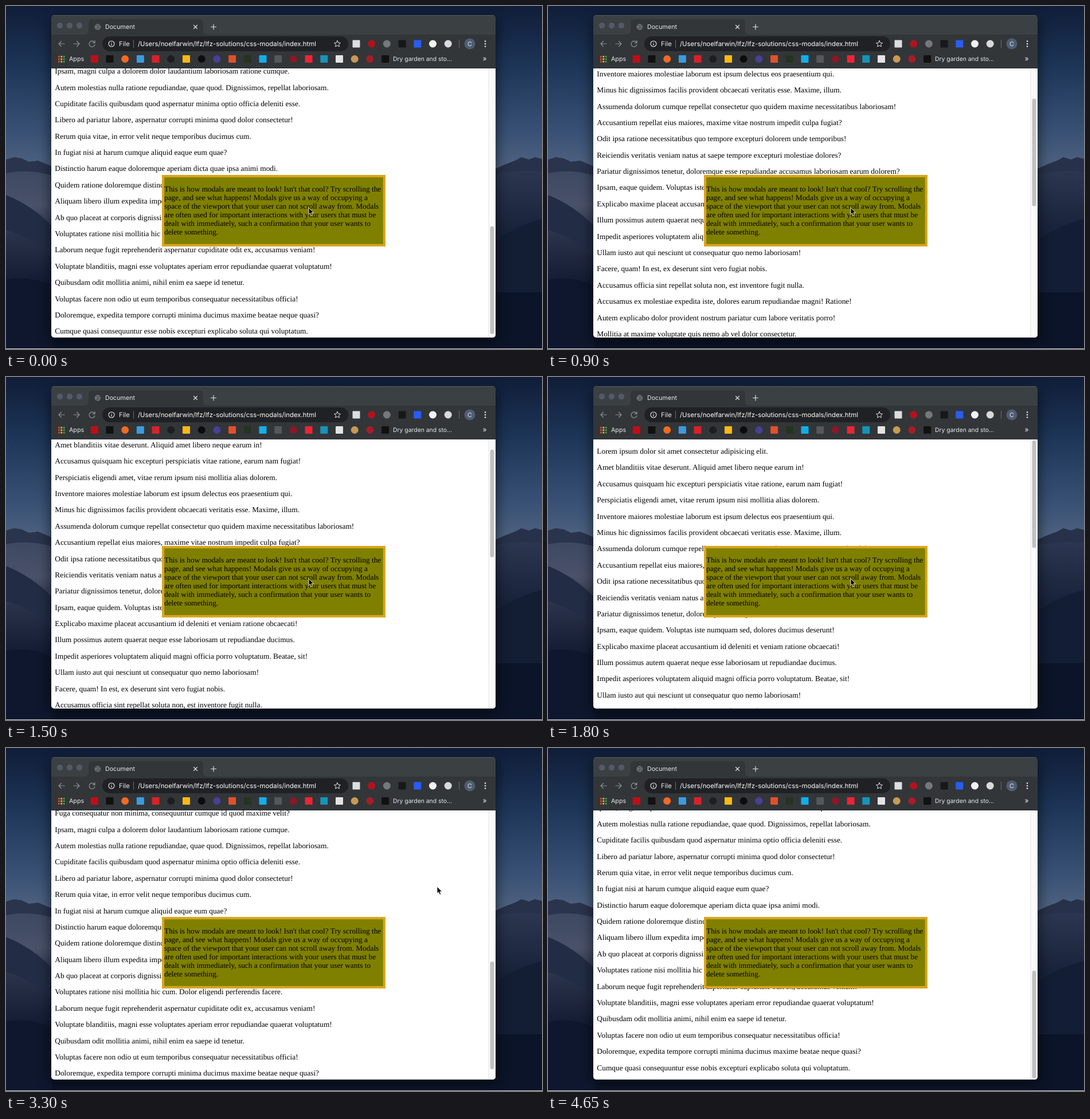
Write an HTML page that moves like this. It is 935x599 px and loops after 5400 ms.

```html
<!DOCTYPE html>
<html lang="en">
<head>
<meta charset="utf-8">
<title>Document</title>
<style>
html, body { margin: 0; height: 100%; overflow: hidden; background: #0b1428; }
svg { display: block; }
text { text-rendering: geometricPrecision; white-space: pre; }
.serif { font: 13.36px "Liberation Serif", "Times New Roman", serif; }
.ui { font: 10.7px Inter, Roboto, sans-serif; fill: #e8eaed; }
.line { fill: none; stroke: #e0e2e5; stroke-width: 1.2; stroke-linecap: round; stroke-linejoin: round; }
.dim { stroke: #8d9196; }
</style>
</head>
<body>
<svg id="stage" width="935" height="599" viewBox="0 0 935 599">
  <defs>
    <linearGradient id="sky" x2="0" y2="1">
      <stop offset="0" stop-color="#101d38"/><stop offset=".35" stop-color="#1d3557"/>
      <stop offset=".75" stop-color="#3a5275"/><stop offset="1" stop-color="#566884"/>
    </linearGradient>
    <linearGradient id="sand" x2="0" y2="1">
      <stop offset="0" stop-color="#3d4862"/><stop offset=".3" stop-color="#4a5269"/>
      <stop offset=".55" stop-color="#2a3249"/><stop offset="1" stop-color="#111a31"/>
    </linearGradient>
    <linearGradient id="dusk" x2="0" y2="1">
      <stop offset="0" stop-color="#2c3650"/><stop offset=".5" stop-color="#182239"/>
      <stop offset="1" stop-color="#0d162b"/>
    </linearGradient>
    <filter id="blur" x="-10%" y="-10%" width="120%" height="120%"><feGaussianBlur stdDeviation="11"/></filter>
    <clipPath id="frame"><rect x="79" y="16" width="775" height="563" rx="5"/></clipPath>
  </defs>

  <!-- desktop -->
  <rect width="935" height="599" fill="#0b1428"/>
  <rect width="935" height="300" fill="url(#sky)"/>
  <path d="M0 268L14 264 27 266 40 272 56 270 80 280V320H0Z" fill="#2a344d"/>
  <path d="M0 292Q40 284 80 296V490L0 478Z" fill="url(#sand)"/>
  <path d="M0 330Q45 348 80 384V440Q40 400 0 392Z" fill="#222c44"/>
  <path d="M0 478Q40 470 80 488V599H0Z" fill="#0e172d"/>
  <path d="M854 284L872 276 888 270 899 264 912 268 923 264 935 267V320H854Z" fill="#27314a"/>
  <path d="M854 294Q900 284 935 290V500H854Z" fill="url(#dusk)"/>
  <path d="M854 408Q900 380 935 372V500H854Z" fill="#131d34"/>
  <path d="M0 598.5H935" stroke="#d5d8de"/>
  <rect x="77" y="24" width="779" height="561" rx="8" fill="#000" opacity=".55" filter="url(#blur)"/>

  <g clip-path="url(#frame)">
    <rect x="79" y="16" width="775" height="93" fill="#3b4043"/>
    <path d="M79 16.5H854" stroke="#5a5e61"/>
    <path d="M136 50Q144 50 144 42V30Q144 23 151 23H337Q344 23 344 30V42Q344 50 352 50H854V109H79V50Z" fill="#323639"/>
    <g fill="#545868"><circle cx="94" cy="34" r="5.2"/><circle cx="111" cy="34" r="5.2"/><circle cx="128" cy="34" r="5.2"/></g>
    <circle cx="160" cy="36.5" r="5.4" fill="#6b6f73"/>
    <path d="M156 33l4 1 1 3-3 3M162 32l2 3M162 39l2-1" class="line" style="stroke:#44484b"/>
    <text x="173" y="40.3" class="ui">Document</text>
    <path d="M327.5 33.5l6 6m0-6l-6 6M357.5 36.5h9m-4.5-4.5v9" class="line"/>
    <path d="M102 66H92m4.5-4.5L92 66l4.500 4.500M118 66h10m-4.500-4.500L128 66l-4.500 4.500M154 63a5 5 0 1 0 1 4.500M155 60.500v3.800h-3.800" class="line dim"/>
    <rect x="168" y="53" width="429" height="26" rx="13" fill="#202124"/>
    <g class="line"><circle cx="184" cy="66" r="5"/><path d="M184 65.500v3M184 63.200v.1"/></g>
    <path d="M222.500 59v14" stroke="#6a6d70"/>
    <path d="M578 60.500l1.600 3.600 3.900.4-2.900 2.600.8 3.900-3.400-2-3.400 2 .8-3.900-2.900-2.600 3.900-.4Z" class="line" style="stroke-width:1"/>
    <text x="197" y="70" class="ui" style="font-size:11.4px">File</text>
    <text x="230" y="70" class="ui" style="font-size:11.4px;fill:#fff">/Users/noelfarwin/lfz/lfz-solutions/css-modals/index.html</text>
    <g id="icons"></g>
    <path d="M790.500 59v14" stroke="#6a6d70"/>
    <circle cx="809" cy="66" r="9.500" fill="#4f5d75"/>
    <text x="809" y="69.800" class="ui" text-anchor="middle">C</text>
    <g fill="#e8eaed"><circle cx="836" cy="61.500" r="1.300"/><circle cx="836" cy="66" r="1.300"/><circle cx="836" cy="70.500" r="1.300"/></g>
    <text x="110" y="96.200" class="ui">Apps</text>
    <text x="675" y="96.200" class="ui" style="font-size:10.4px">Dry garden and sto...</text>
    <text x="831.500" y="96" class="ui" style="font-size:12px">»</text>

    <svg x="79" y="108" width="775" height="471">
      <rect width="775" height="471" fill="#fff"/>
      <g id="list" class="serif"></g>
      <rect x="763" width="12" height="471" fill="#fafafa"/>
      <path d="M763 0V471" stroke="#e4e4e4"/>
      <rect id="thumb" x="765.500" width="7" height="188" rx="3.500" fill="#c1c1c1"/>
    </svg>
    <path d="M79 108.500H854" stroke="#25282a"/>
    <rect x="274.100" y="297.100" width="385.800" height="120.800" fill="#808000" stroke="#daa520" stroke-width="4.200"/>
    <g id="modal" class="serif"></g>
  </g>
  <path id="cursor" d="M0 0V12.200L2.700 9.700 4.700 14.300 6.800 13.400 4.900 8.900H8.600Z" fill="#000" stroke="#fff" stroke-width=".9"/>
</svg>
<script>
const $ = id => document.getElementById(id);

function add(parent, tag, attrs, text) {
  const el = document.createElementNS('http://www.w3.org/2000/svg', tag);
  for (const k in attrs) el.setAttribute(k, attrs[k]);
  if (text) el.textContent = text;
  $(parent).append(el);
}

const paragraphs = `Lorem ipsum dolor sit amet consectetur adipisicing elit.
Amet blanditiis vitae deserunt. Aliquid amet libero neque earum in!
Accusamus quisquam hic excepturi perspiciatis vitae ratione, earum nam fugiat!
Perspiciatis eligendi amet, vitae rerum ipsum nisi mollitia alias dolorem.
Inventore maiores molestiae laborum est ipsum delectus eos praesentium qui.
Minus hic dignissimos facilis provident obcaecati veritatis esse. Maxime, illum.
Assumenda dolorum cumque repellat consectetur quo quidem maxime necessitatibus laboriosam!
Accusantium repellat eius maiores, maxime vitae nostrum impedit culpa fugiat?
Odit ipsa ratione necessitatibus quo tempore excepturi dolorem unde temporibus!
Reiciendis veritatis veniam natus at saepe tempore excepturi molestiae dolores?
Pariatur dignissimos tenetur, doloremque esse repudiandae accusamus laboriosam earum dolorem?
Ipsam, eaque quidem. Voluptas iste numquam sed, dolores ducimus deserunt!
Explicabo maxime placeat accusantium id deleniti et veniam ratione obcaecati!
Illum possimus autem quaerat neque esse laboriosam ut repudiandae ducimus.
Impedit asperiores voluptatem aliquid magni officia porro voluptatum. Beatae, sit!
Ullam iusto aut qui nesciunt ut consequatur quo nemo laboriosam!
Facere, quam! In est, ex deserunt sint vero fugiat nobis.
Accusamus officia sint repellat soluta non, est inventore fugit nulla.
Accusamus ex molestiae expedita iste, dolores earum repudiandae magni! Ratione!
Autem explicabo dolor provident nostrum pariatur cum labore veritatis porro!
Mollitia at maxime voluptate quis nemo ab vel dolor consectetur.
Animi tempora dolorem necessitatibus quos ipsum rerum exercitationem unde modi?
Fuga consequatur non minima, consequuntur cumque id quod maxime velit?
Ipsam, magni culpa a dolorem dolor laudantium laboriosam ratione cumque.
Autem molestias nulla ratione repudiandae, quae quod. Dignissimos, repellat laboriosam.
Cupiditate facilis quibusdam quod aspernatur minima optio officia deleniti esse.
Libero ad pariatur labore, aspernatur corrupti minima quod dolor consectetur!
Rerum quia vitae, in error velit neque temporibus ducimus cum.
In fugiat nisi at harum cumque aliquid eaque eum quae?
Distinctio harum eaque doloremque aperiam dicta quae ipsa animi modi.
Quidem ratione doloremque distinctio? Eius perferendis corrupti tenetur maxime minus?
Aliquam libero illum expedita impedit earum rem sit aperiam voluptate.
Ab quo placeat at corporis dignissimos, eaque itaque! Blanditiis, dolorem.
Voluptates ratione nisi mollitia hic cum. Dolor eligendi perferendis facere.
Laborum neque fugit reprehenderit aspernatur cupiditate odit ex, accusamus veniam!
Voluptate blanditiis, magni esse voluptates aperiam error repudiandae quaerat voluptatum!
Quibusdam odit mollitia animi, nihil enim ea saepe id tenetur.
Voluptas facere non odio ut eum temporibus consequatur necessitatibus officia!
Doloremque, expedita tempore corrupti minima ducimus maxime beatae neque quasi?
Cumque quasi consequuntur esse nobis excepturi explicabo soluta qui voluptatum.`;
paragraphs.split('\n').forEach((p, i) => add('list', 'text', { x: 6.3, y: 26 + i * 28.39 }, p));

`This is how modals are meant to look! Isn't that cool? Try scrolling the
page, and see what happens! Modals give us a way of occupying a
space of the viewport that your user can not scroll away from. Modals
are often used for important interactions with your users that must be
dealt with immediately, such a confirmation that your user wants to
delete something.`.split('\n').forEach((s, i) => add('modal', 'text', { x: 276, y: 324.2 + i * 15.03 }, s));

// plain marks: an upper-case letter is a square, "o" a circle
const disc = (x, y, fill, r = 6.5) => add('icons', 'circle', { cx: x, cy: y, r, fill });
const box = (x, y, fill) => add('icons', 'rect', { x: x - 6.5, y: y - 6.5, width: 13, height: 13, rx: 1, fill });
function marks(x0, y, list) {
  list.split(' ').forEach((m, i) => (m[0] == 'o' ? disc : box)(x0 + i * 26.7, y, m.slice(1)));
}
marks(611, 66, 'S#dcdee0 o#b3121d o#76797c S#17181a S#2a5cf0 o#f2f2f2 o#d8dadc');
marks(154.3, 92.5, 'S#c20d17 S#111 o#f26a21 S#3a9be0 S#d8222a o#1c1e20 S#fdb913 o#0c0c0c o#4a3f96 ' +
  'S#e2502a S#26331f S#12aeea S#55585b o#8c1725 S#ee2435 S#1893b8 S#e4e4e4 o#c99a54 o#a81c28 S#111');
const dots = ['#ea4335', '#fbbc04', '#34a853', '#4285f4'];
for (let i = 0; i < 9; i++)
  add('icons', 'rect', { x: 91 + i % 3 * 4.4, y: 87 + (i / 3 | 0) * 4.4, width: 2.8, height: 2.8, fill: dots[(i + (i / 3 | 0)) % 4] });

// [time, value...]; each pose holds until the next
const scroll = [[0, 668.8], [150, 570], [300, 330], [450, 171.8], [600, 143],
  [900, 124.8], [1050, 94], [1200, 72], [1500, 39.6], [1650, 12], [1800, 0],
  [2100, 90], [2250, 290], [2400, 477.5], [2550, 570], [2700, 615], [2850, 636], [3000, 640.4],
  [3600, 678.6]];
const pointer = [[0, 528, 352], [3000, 748, 290], [3150, 748, 262], [3300, 752, 242],
  [4050, 758, 268], [4200, 796, 368], [4350, 848, 486], [4500, 888, 578], [4650, 900, 640]];
const pose = (keys, t) => keys.findLast(k => k[0] <= t);

function draw(now) {
  const t = now % 5400, [, s] = pose(scroll, t), [, x, y] = pose(pointer, t);
  $('list').setAttribute('transform', `translate(0 ${-s})`);
  $('thumb').setAttribute('y', 2.5 + s * .41);
  $('cursor').setAttribute('transform', `translate(${x} ${y})`);
  requestAnimationFrame(draw);
}
draw(performance.now());
</script>
</body>
</html>
```
